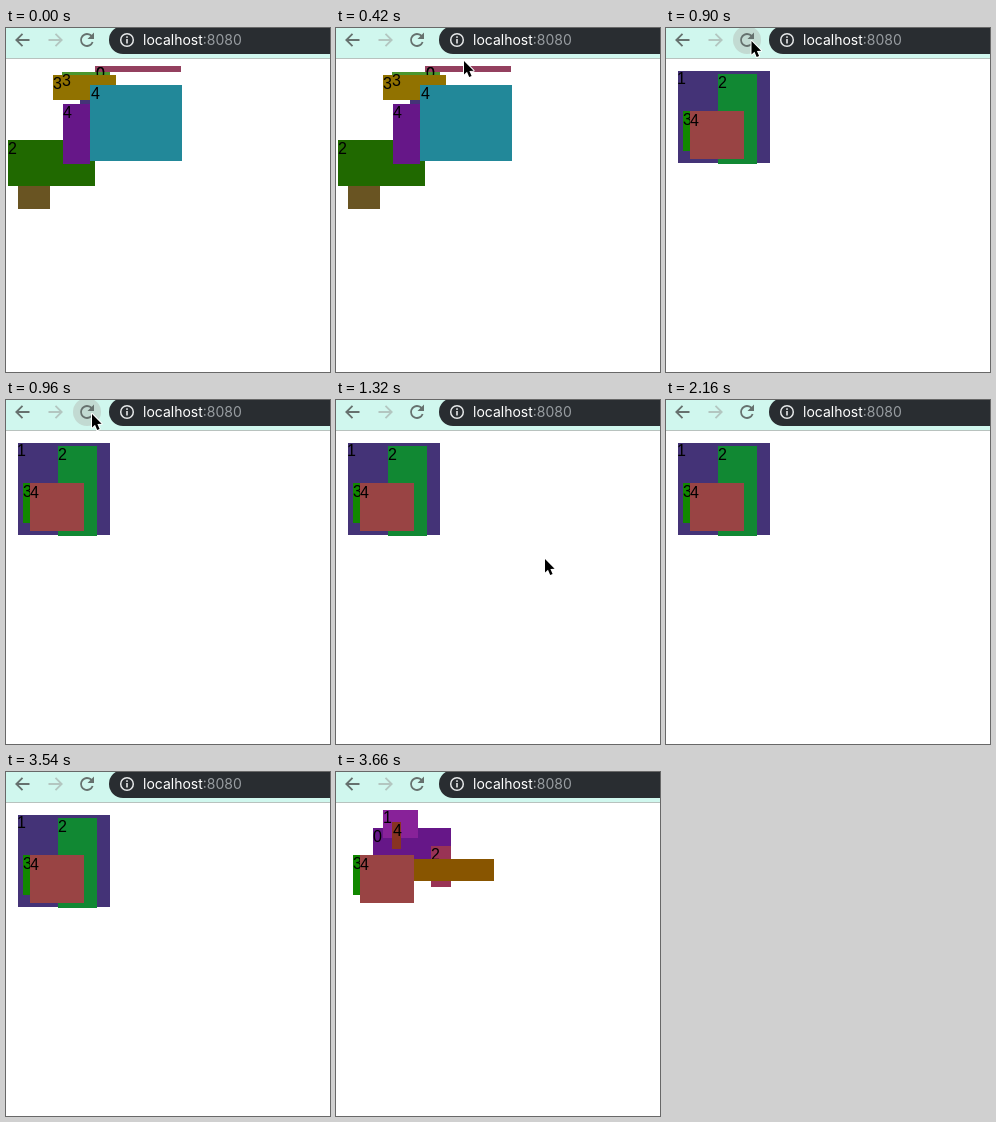
An HTML page with a canvas for the animation above (4320 ms loop, 324 by 344 pixels).

```html
<!DOCTYPE html>
<html lang="en">
<head>
<meta charset="utf-8">
<title>Random boxes</title>
<style>
html, body { margin: 0; width: 100%; height: 100%; overflow: hidden; background: #fff; }
canvas { display: block; }
</style>
</head>
<body>
<canvas id="stage" width="324" height="344"></canvas>
<script>
const ctx = document.getElementById('stage').getContext('2d');
const LOOP = 4320, STEP = 60;

// Boxes: [colour, left, top, right, bottom]; labels: [text, x, baseline]
const pageA = [
  ['#94405f', 89, 38, 175, 44],
  ['0', 90, 51],
  ['#917200', 47, 47, 110, 72],
  ['3', 47, 61],
  ['#4b962e', 56, 44, 104, 50],
  ['0', 90, 51, 47],
  ['#917200', 56, 47, 110, 72],
  ['3', 56, 58],
  ['#443377', 74, 72, 84, 77],
  ['#206900', 2, 112, 89, 158],
  ['2', 2, 126],
  ['#695422', 12, 158, 44, 181],
  ['#661788', 57, 76, 84, 136],
  ['4', 57, 90],
  ['#228899', 84, 57, 176, 133],
  ['4', 85, 71]
];
const lowerPair = [
  ['#118800', 17, 83, 24, 123],
  ['3', 17, 97],
  ['#994444', 24, 83, 78, 131],
  ['4', 24, 98]
];
const pageB = [
  ['#443377', 12, 43, 104, 135],
  ['1', 11, 56],
  ['#118833', 52, 46, 91, 136],
  ['2', 52, 60],
  ...lowerPair
];
const pageC = [
  ['#661788', 37, 56, 115, 87],
  ['0', 37, 70],
  ['#882299', 47, 38, 82, 66],
  ['1', 47, 51],
  ['#993355', 95, 74, 115, 115],
  ['2', 95, 88],
  ['#883322', 56, 50, 65, 77],
  ['4', 57, 64],
  ['#885500', 78, 87, 158, 109],
  ...lowerPair
];

// Pointer path: [time, x, y]
const path = [
  [120, 287, 130], [240, 226, 88], [420, 128, 33], [600, 85, 12],
  [840, 85, 12], [960, 86, 14], [1140, 86, 14],
  [1200, 130, 62], [1260, 185, 133], [1320, 209, 159],
  [1980, 209, 159], [2040, 196, 203], [2100, 171, 281]
];

function pointerAt(t) {
  if (t < path[0][0] || t >= 2160) return null;
  for (let i = 1; i < path.length; i++) {
    const [t0, x0, y0] = path[i - 1], [t1, x1, y1] = path[i];
    if (t <= t1) {
      const k = (t - t0) / (t1 - t0);
      return [x0 + (x1 - x0) * k, y0 + (y1 - y0) * k];
    }
  }
  return path[path.length - 1].slice(1);
}

function rect(color, l, t, r, b) {
  ctx.fillStyle = color;
  ctx.fillRect(l, t, r - l, b - t);
}

function disc(color, x, y, r) {
  ctx.fillStyle = color;
  ctx.beginPath();
  ctx.arc(x, y, r, 0, Math.PI * 2);
  ctx.fill();
}

function stroke(color, width, draw) {
  ctx.strokeStyle = color;
  ctx.lineWidth = width;
  ctx.beginPath();
  draw();
  ctx.stroke();
}

function label(text, x, y, bottom = 344) {
  ctx.save();
  ctx.beginPath();
  ctx.rect(0, 31, 324, bottom - 31);
  ctx.clip();
  ctx.fillStyle = '#000';
  ctx.font = '16px "Liberation Sans", Arial, sans-serif';
  ctx.fillText(text, x, y);
  ctx.restore();
}

function drawPage(items) {
  for (const item of items) {
    if (item[0][0] === '#') rect(...item);
    else label(...item);
  }
}

function arrow(color, x, dir) {
  stroke(color, 1.8, () => {
    ctx.moveTo(x - dir * 6.5, 12);
    ctx.lineTo(x + dir * 6.5, 12);
    ctx.moveTo(x + dir * 0.5, 5.8);
    ctx.lineTo(x + dir * 6.7, 12);
    ctx.lineTo(x + dir * 0.5, 18.2);
  });
}

function drawToolbar(hover) {
  rect('#d0f7ee', 0, 0, 324, 30);
  rect('#b8c2be', 0, 30, 324, 31);
  if (hover) disc('#c2dad2', 81, 12, 14);

  arrow('#66716e', 17, -1);
  arrow('#b3c6c0', 49, 1);
  stroke('#66716e', 1.8, () => ctx.arc(81, 12, 6, 0.35, Math.PI * 1.78));
  ctx.fillStyle = '#66716e';
  ctx.beginPath();
  ctx.moveTo(88, 4.5);
  ctx.lineTo(88, 11);
  ctx.lineTo(81.5, 11);
  ctx.fill();

  ctx.fillStyle = '#292d31';
  ctx.beginPath();
  ctx.roundRect(103, -2, 260, 28, 14);
  ctx.fill();

  stroke('#e6e8e9', 1.5, () => ctx.arc(121, 12, 6.3, 0, Math.PI * 2));
  rect('#e6e8e9', 120.2, 11, 121.8, 15.5);
  rect('#e6e8e9', 120.2, 8.3, 121.8, 9.9);

  ctx.font = '14px Inter, Roboto, sans-serif';
  ctx.fillStyle = '#fff';
  ctx.fillText('localhost', 137, 17);
  const w = ctx.measureText('localhost').width;
  ctx.fillStyle = '#989da1';
  ctx.fillText(':8080', 137 + w, 17);
}

function drawPointer(x, y) {
  const outline = [[0, 0], [0, 13.5], [3, 10.8], [5.2, 16], [7.6, 15], [5.4, 9.9], [9.6, 9.7]];
  ctx.beginPath();
  for (const [dx, dy] of outline) ctx.lineTo(x + dx, y + dy);
  ctx.closePath();
  ctx.lineJoin = 'round';
  ctx.strokeStyle = '#fff';
  ctx.lineWidth = 2;
  ctx.stroke();
  ctx.fillStyle = '#000';
  ctx.fill();
  ctx.lineJoin = 'miter';
}

function render(t) {
  rect('#fff', 0, 0, 324, 344);
  drawPage(t < 900 ? pageA : t < 3600 ? pageB : pageC);
  drawToolbar(t >= 660 && t < 1200);
  const p = pointerAt(t);
  if (p) drawPointer(...p);
}

const start = performance.now();
function tick() {
  const t = (performance.now() - start) % LOOP;
  render(Math.floor(t / STEP) * STEP);
  requestAnimationFrame(tick);
}
tick();
</script>
</body>
</html>
```
